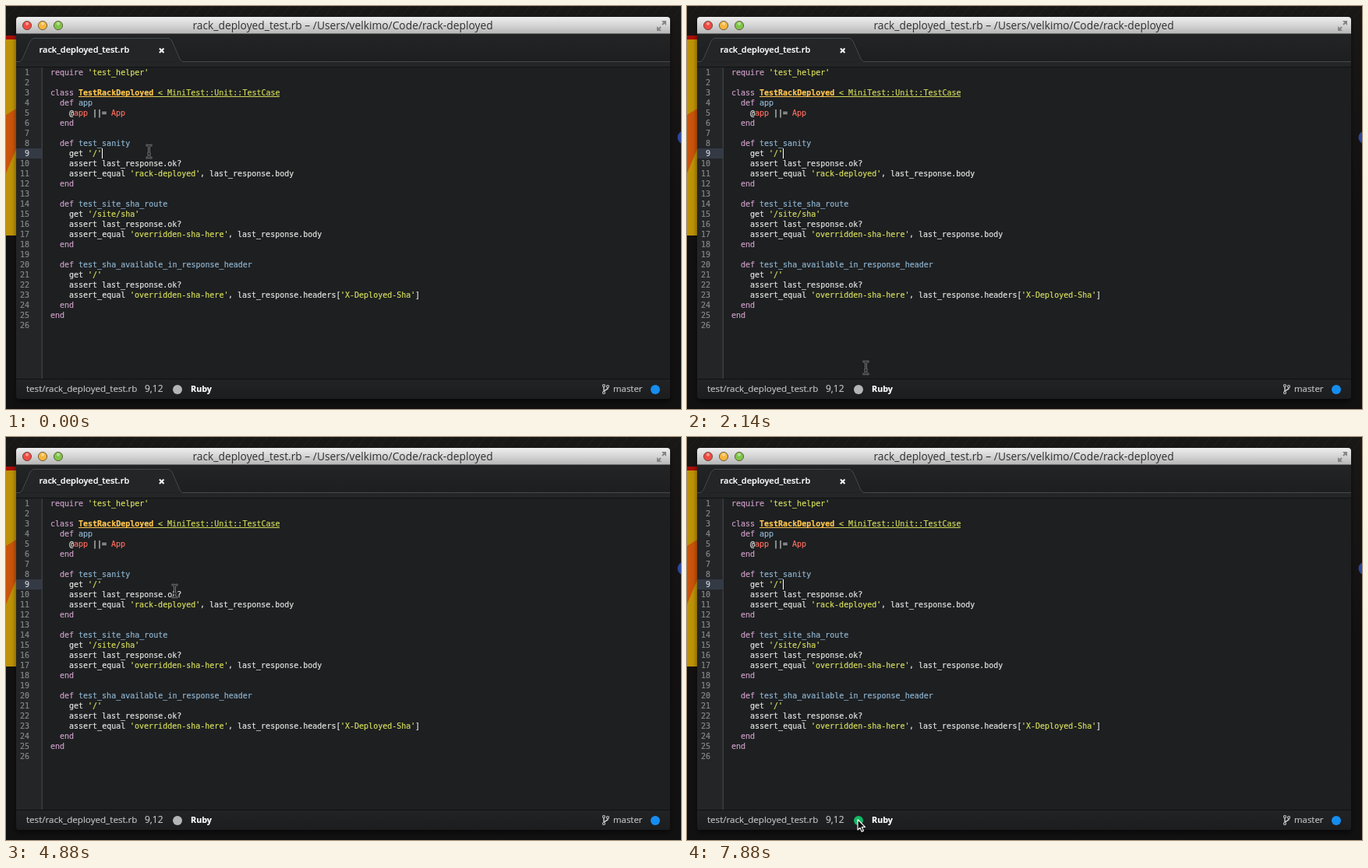
Write an HTML page with a canvas that moves like this. It is 866 by 518 pixels and loops after 7.99 s.

```html
<!DOCTYPE html>
<html lang="en">
<head>
<meta charset="utf-8">
<title>Editor</title>
<style>
html, body { margin: 0; width: 100%; height: 100%; overflow: hidden; background: #131110; }
canvas { display: block; }
</style>
</head>
<body>
<canvas id="stage" width="866" height="518"></canvas>
<script>
const ctx = document.getElementById('stage').getContext('2d');
const LOOP = 7990;
const UI = '"Open Sans", "Noto Sans", sans-serif';
const MONO = '"DejaVu Sans Mono", monospace';
const WIN = { x: 13, y: 14, w: 839, h: 491 };
const ROW = 13, CODE_TOP = 79, CODE_LEFT = 57, CHAR = 6, STATUS_TOP = 479;
const ACTIVE_ROW = 8, CARET_COLUMN = 11;

const CODE = `require 'test_helper'

class TestRackDeployed < MiniTest::Unit::TestCase
  def app
    @app ||= App
  end

  def test_sanity
    get '/'
    assert last_response.ok?
    assert_equal 'rack-deployed', last_response.body
  end

  def test_site_sha_route
    get '/site/sha'
    assert last_response.ok?
    assert_equal 'overridden-sha-here', last_response.body
  end

  def test_sha_available_in_response_header
    get '/'
    assert last_response.ok?
    assert_equal 'overridden-sha-here', last_response.headers['X-Deployed-Sha']
  end
end
`.split('\n');

const TOKENS = /(?<fn>(?<=def )\w+)|(?<kw>\b(?:require|class|def|end)\b)|(?<str>'[^']*')|(?<ref>(?<=@)app|App)|(?<cls>TestRackDeployed)|(?<sup> < MiniTest\S+)|(?<rest>@|[^\s'@]+)/g;
const COLORS = {
  fn: '#8fb4cf', kw: '#cb9dc4', str: '#d6dd5c', ref: '#fb6c5e',
  cls: '#ffc64f', sup: '#d0d858', rest: '#e2e4e0'
};

// A space is typed on the caret line, then the file is saved and its tests run
const TYPED = 5110, MODIFIED = 5410, SAVED = 5530, DIFF_CLEARED = 5830, PASSED = 6310;

const MOVES = [
  { from: 450, to: 920, x: 176, y: 487 },
  { from: 1220, to: 1400, x: 231, y: 473 },
  { from: 1400, to: 1980, x: 227, y: 499 },
  { from: 2030, to: 2140, x: 229, y: 465 },
  { from: 2440, to: 2910, x: 212, y: 237 },
  { from: 3450, to: 3500, x: 212, y: 215 },
  { from: 3500, to: 3680, x: 216, y: 198 },
  { from: 6730, to: 6960, x: 239, y: 349 },
  { from: 6960, to: 7480, x: 215, y: 481 },
  { from: 7540, to: 7700, x: 218, y: 491 }
];

function rect(x, y, w, h, fill) {
  ctx.fillStyle = fill;
  ctx.fillRect(x, y, w, h);
}

function circle(x, y, r, fill, stroke, width = 1) {
  ctx.beginPath();
  ctx.arc(x, y, r, 0, Math.PI * 2);
  if (fill) { ctx.fillStyle = fill; ctx.fill(); }
  if (stroke) { ctx.strokeStyle = stroke; ctx.lineWidth = width; ctx.stroke(); }
}

function trace(points, close) {
  ctx.beginPath();
  points.forEach(([x, y], i) => i ? ctx.lineTo(x, y) : ctx.moveTo(x, y));
  if (close) ctx.closePath();
}

function shape(points, fill) {
  trace(points, true);
  ctx.fillStyle = fill;
  ctx.fill();
}

function line(points, stroke, width = 1) {
  trace(points);
  ctx.strokeStyle = stroke;
  ctx.lineWidth = width;
  ctx.stroke();
}

// A hairline outline gives text the weight of smoothed type
function label(text, x, y, font, color, align = 'left', weight = 0.2) {
  ctx.font = font;
  ctx.fillStyle = ctx.strokeStyle = color;
  ctx.textAlign = align;
  ctx.fillText(text, x, y);
  ctx.lineWidth = weight;
  if (weight) ctx.strokeText(text, x, y);
}

function gradient(y0, y1, ...stops) {
  const g = ctx.createLinearGradient(0, y0, 0, y1);
  stops.forEach((c, i) => g.addColorStop(i / (stops.length - 1), c));
  return g;
}

function drawDesktop() {
  rect(0, 0, 866, 518, gradient(0, 518, '#1a1816', '#121011', '#121112'));
  for (let x = 0; x < 900; x += 14) line([[x, 0], [x - 12, 14]], 'rgba(255,255,255,.04)');
  rect(0, 38, 13, 5, '#a90d08');
  rect(0, 43, 13, 252, '#bd9206');
  shape([[0, 140], [13, 132], [13, 184], [0, 215]], '#c9540a');
  circle(870, 169, 8.5, '#2d479f');
}

function drawTitleBar() {
  rect(WIN.x, WIN.y, WIN.w, 22, gradient(14, 36, '#eeeeee', '#d4d4d4', '#b4b4b4'));
  rect(WIN.x, 35, WIN.w, 1, '#6c6c6c');
  ['#ee4b43', '#f5b63c', '#7fc548'].forEach((fill, i) => {
    const x = 27 + 20 * i;
    circle(x, 25, 5.6, fill, 'rgba(60,40,30,.65)');
    circle(x, 22.7, 2, 'rgba(255,255,255,.45)');
  });
  label('rack_deployed_test.rb – /Users/velkimo/Code/rack-deployed', 432, 30,
    '13.8px ' + UI, '#303030', 'center', 0);
  for (const side of [-1, 1]) {
    const at = (dx, dy) => [841 + side * dx, 25.5 - side * dy];
    shape([at(0, 6.5), at(6, 6.5), at(6, 0.5)], '#858585');
    line([at(1, 1.5), at(4, 4.5)], '#858585', 2);
  }
}

function drawTab(modified) {
  rect(WIN.x, 36, WIN.w, 43, gradient(36, 79, '#222426', '#1b1d1f'));
  rect(WIN.x, 72, WIN.w, 6, '#232527');
  const flank = [[0, 71.5], [3, 68], [13, 45], [17, 41.5]];
  const outline = [
    ...flank.map(([dx, y]) => [18 + dx, y]),
    ...flank.map(([dx, y]) => [226 - dx, y]).reverse()
  ];
  shape(outline, '#232527');
  line([[WIN.x, 71.5], ...outline, [WIN.x + WIN.w, 71.5]], '#45484b');
  rect(WIN.x, 78, WIN.w, 1, '#111214');
  label('rack_deployed_test.rb', 42.5, 60, '600 11px ' + UI, '#ffffff');
  if (modified) {
    circle(200, 57, 3.6, null, '#6494ed', 2);
  } else {
    for (const d of [-2.8, 2.8]) line([[199.7 - d, 54.5], [199.7 + d, 60]], '#f6f6f6', 2);
  }
}

function drawCode(changed) {
  const activeTop = CODE_TOP + ACTIVE_ROW * ROW;
  rect(WIN.x, CODE_TOP, WIN.w, 400, '#1d1f21');
  rect(WIN.x, CODE_TOP, 33, 400, '#242527');
  rect(45.5, CODE_TOP, 1.5, 400, '#3b3d40');
  rect(WIN.x, activeTop, 33, ROW, '#343a45');
  if (changed) rect(WIN.x, activeTop, 2, ROW, '#d8a548');

  CODE.forEach((text, i) => {
    const y = CODE_TOP + i * ROW + 10;
    label(i + 1, 30, y, '10px ' + MONO, i === ACTIVE_ROW ? '#d5d7da' : '#85888a', 'right');
    for (const match of text.matchAll(TOKENS)) {
      const [kind, word] = Object.entries(match.groups).find(([, value]) => value);
      const x = CODE_LEFT + match.index * CHAR;
      const bold = kind === 'cls';
      label(word, x, y, (bold ? 'bold ' : '') + '10px ' + MONO, COLORS[kind]);
      if (bold || kind === 'sup') rect(x, y + 1, word.length * CHAR, 1, COLORS[kind]);
    }
  });
}

function drawBranch(color) {
  line([[767, 489], [767, 496]], color, 1.5);
  line([[772, 490], [772, 492], [767, 495]], color, 1.5);
  for (const [x, y] of [[767, 488], [772, 489], [767, 497]]) circle(x, y, 1.5, '#1e2022', color, 1.2);
}

function drawStatus(t) {
  const grey = '#bfc1c2', base = 496;
  const column = CARET_COLUMN + typedChars(t) + 1;
  const build = t < SAVED ? '#b3b5b6' : t < PASSED ? '#f48d18' : '#12b964';
  rect(WIN.x, STATUS_TOP, WIN.w, 26, gradient(479, 505, '#212325', '#1b1d1f'));
  rect(WIN.x, STATUS_TOP, WIN.w, 1, '#101113');
  label('test/rack_deployed_test.rb', 26, base, '11.6px ' + UI, grey);
  label('9,' + column, 178, base, '12px ' + UI, grey);
  circle(220, 493, 6, build);
  label('Ruby', 237, base, 'bold 10.8px ' + UI, '#ffffff');
  drawBranch(grey);
  label('master', 779, base, '11.4px ' + UI, grey);
  circle(833, 493, 6, '#168df0');
}

function typedChars(t) {
  return t >= TYPED && t < SAVED ? 1 : 0;
}

// Edits hold the caret on and restart its blinking
function caretShown(t) {
  if (t >= TYPED && t < SAVED) return true;
  const toggles = t < TYPED ? Math.floor((t - 110) / 397) + 1 : Math.floor((t - 5430) / 408);
  return toggles % 2 === 0;
}

function drawWindow(t) {
  ctx.save();
  ctx.shadowColor = 'rgba(0,0,0,.5)';
  ctx.shadowBlur = 6;
  ctx.shadowOffsetY = 4;
  ctx.beginPath();
  ctx.roundRect(WIN.x, WIN.y, WIN.w, WIN.h, 4);
  ctx.fillStyle = '#1d1f21';
  ctx.fill();
  ctx.restore();

  ctx.save();
  ctx.clip();
  drawTitleBar();
  drawTab(t >= MODIFIED && t < SAVED);
  drawCode(t >= MODIFIED && t < DIFF_CLEARED);
  drawStatus(t);
  ctx.restore();

  if (caretShown(t)) {
    const x = CODE_LEFT + (CARET_COLUMN + typedChars(t)) * CHAR;
    rect(x, CODE_TOP + ACTIVE_ROW * ROW, 1, ROW, '#ffffff');
  }
}

function pointerAt(t) {
  let x = 183, y = 187;
  for (const move of MOVES) {
    const k = Math.min(1, Math.max(0, (t - move.from) / (move.to - move.from)));
    x += (move.x - x) * k;
    y += (move.y - y) * k;
  }
  return [Math.round(x), Math.round(y)];
}

function drawBeam() {
  for (const [color, width] of [['#8d8f90', 2.6], ['#1d1f21', 1.2]]) {
    for (const side of [-1, 1]) {
      line([[4, -8], [1.5, -8], [0, -6.5], [0, 6.5], [1.5, 8], [4, 8]]
        .map(([x, y]) => [x * side, y]), color, width);
    }
    line([[-2.5, 3], [2.5, 3]], color, width);
  }
}

function drawArrow() {
  const points = [[0.5, 0.5], [0.5, 14], [3.5, 11.3], [5.7, 16.3], [8, 15.3], [5.9, 10.4], [10, 10.4]];
  shape(points, '#0b0b0b');
  line([...points, points[0]], '#f4f4f4', 1.2);
}

function drawPointer(t) {
  const [x, y] = pointerAt(t);
  ctx.save();
  ctx.translate(x + 0.5, y);
  if (y < STATUS_TOP) drawBeam();
  else drawArrow();
  ctx.restore();
}

let origin;
function frame(now) {
  origin ??= now;
  const t = (now - origin) % LOOP;
  ctx.lineJoin = 'round';
  drawDesktop();
  drawWindow(t);
  drawPointer(t);
  requestAnimationFrame(frame);
}
requestAnimationFrame(frame);
</script>
</body>
</html>
```
